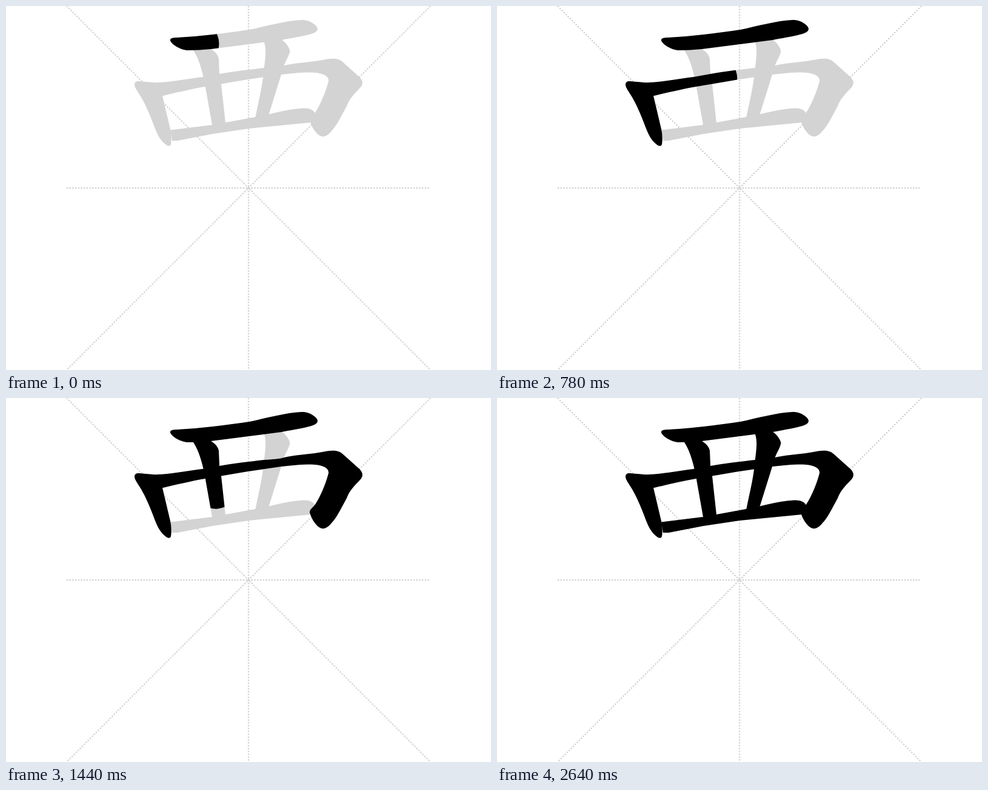
Animation, 800 px wide and 600 px high, one loop 2700 ms. Source, as an HTML page:

```html
<!DOCTYPE html>
<html lang="en">
<head>
<meta charset="utf-8">
<title>Stroke order</title>
<style>
  html, body { margin: 0; width: 100%; height: 100%; overflow: hidden; background: #fff; }
  svg { display: block; }
  #guides { stroke: lightgray; stroke-dasharray: 1 1; }
  #shapes { fill: lightgray; }
  #pens { fill: none; stroke: #000; stroke-linecap: round; stroke-linejoin: round; }
</style>
</head>
<body>
<svg width="800" height="600" viewBox="0 0 800 600">
  <defs>
    <clipPath id="clip1"><path id="shape1" d="M271 57C270 53 276 52 283 52C322 50 360 45 402 39C430 33 462 24 488 23C500 22 514 32 514 38C513 46 498 48 455 56L424 60L338 71C325 72 313 73 301 73C287 73 272 62 271 57Z"/></clipPath>
    <clipPath id="clip2"><path id="shape2" d="M212 130C212 125 215 124 219 124L248 126.500C254 128 255 133 258 148L271 203C273 212 273 222 272 228C271 231 268 232 263 228C248 217 245 195 232 168C222 145 213 138 212 130Z"/></clipPath>
    <clipPath id="clip3"><path id="shape3" d="M246 126.500C275 125 300 120 324 117L352 112C380 107 400 105 426 102C438 101 450 101 459 98C480 93 505 93 530 87.500C542 86 549 87 555 92L583 117C590 124 589 130 583 136C574 145 566 154 562 165C551 185 545 198 537 206C528 217 521 217 515 212C509 207 504 199 501 189C500 184 507 180 511 174C519 161 527 143 532 124C533 114 520 109 496 109.500C480 110 466 112 454 113L396 121.500L355 128.500L328 133C305 137 280 143 259 148L246 146Z"/></clipPath>
    <clipPath id="clip4"><path id="shape4" d="M309 73L306 64L325 63L338 71C345 75 351 82 351 88L352 112L355 129L362 193C361 204 357 208 350 207C344 207 341 203 340 196L329 134C325 112 320 90 309 73Z"/></clipPath>
    <clipPath id="clip5"><path id="shape5" d="M426 60L430 50L446 50L455 56C462 60 470 72 468 76C466 84 461 91 459 97L454 113L434 177C430 189 425 193 417 193.500C411 194 410 189 412 180C417 155 421 140 424 118C426 95 431 75 426 60Z"/></clipPath>
    <clipPath id="clip6"><path id="shape6" d="M271 204.500L340 196L362 192L411 183C432 180 460 170 490 168.500C500 168 506 171 509 175L510 184L503 192L400 202L340 211L283 222L274 222Z"/></clipPath>
  </defs>
  <g id="guides" transform="translate(100) scale(2.34375)">
    <path d="M0 0L256 256"/>
    <path d="M256 0L0 256"/>
    <path d="M128 0V256"/>
    <path d="M0 128H256"/>
  </g>
  <g id="shapes">
    <use href="#shape1"/><use href="#shape2"/><use href="#shape3"/>
    <use href="#shape4"/><use href="#shape5"/><use href="#shape6"/>
  </g>
  <g id="pens">
    <path clip-path="url(#clip1)" data-start="-90" data-end="530" d="M282 62H314L461 40L500 36"/>
    <path clip-path="url(#clip2)" data-start="381" data-end="690" d="M222 130L231 138L246 172L264 215"/>
    <path clip-path="url(#clip3)" data-start="543" data-end="1393" d="M245 137L359 119L502 101L544 102L553 117L540 160L521 205"/>
    <path clip-path="url(#clip4)" data-start="1170" data-end="1610" d="M313 72L319 79L334 105L346 145L351 196"/>
    <path clip-path="url(#clip5)" data-start="1560" data-end="1948" d="M441 62L447 80L440 110L418 184"/>
    <path clip-path="url(#clip6)" data-start="1800" data-end="2400" d="M280 212L301.500 207L411 191L500 180"/>
  </g>
</svg>
<script>
  const LOOP = 2700, STEP = 60, PEN_WIDTH = 75, FULL_WIDTH = 600;

  const pens = [...document.querySelectorAll("#pens path")].map(el => ({
    el,
    start: +el.dataset.start,
    end: +el.dataset.end,
    length: el.getTotalLength(),
  }));

  function render(now) {
    const time = Math.floor(now % LOOP / STEP) * STEP;
    for (const { el, start, end, length } of pens) {
      const progress = Math.min((time - start) / (end - start), 1);
      el.style.display = progress > 0 ? "" : "none";
      // A finished stroke fills its whole outline.
      el.style.strokeWidth = progress < 1 ? PEN_WIDTH : FULL_WIDTH;
      el.style.strokeDasharray = `${Math.max(progress, 0) * length} ${2 * length}`;
    }
    requestAnimationFrame(render);
  }
  render(performance.now());
</script>
</body>
</html>
```
